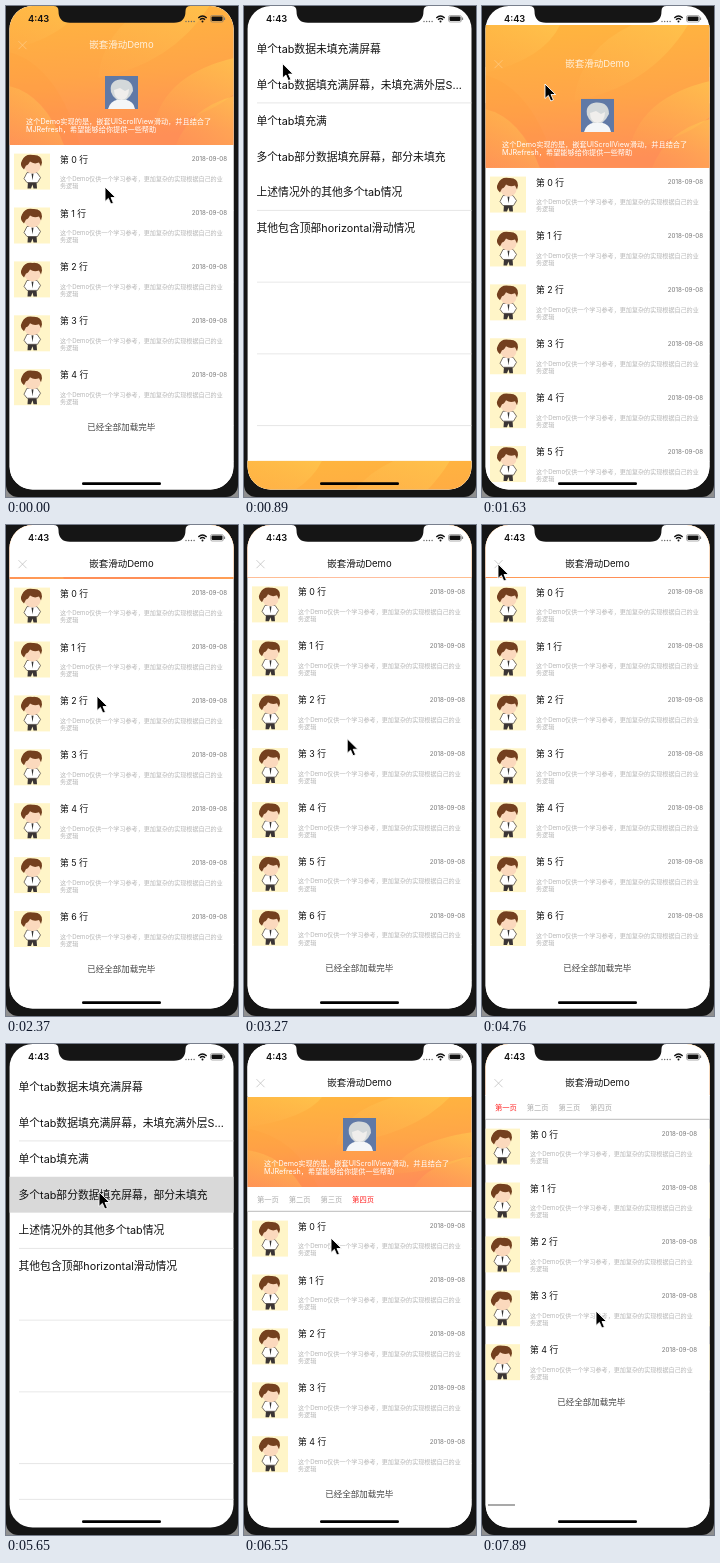
Write an HTML page that moves like this. It is 232 px wide and 491 px high and loops after 8000 ms.

```html
<!DOCTYPE html>
<html lang="zh-CN">
<head>
<meta charset="utf-8">
<style>
html, body { margin: 0; width: 100%; height: 100%; overflow: hidden; background: #8f8f8f; }
svg { display: block; width: 232px; height: 491px; }
text { font-family: Inter, "Noto Sans CJK SC", "Noto Sans CJK", sans-serif; white-space: pre; }
.menu { font-size: 10.8px; fill: #111; }
.title { font-size: 9.5px; text-anchor: middle; }
.name { font-size: 8.8px; fill: #111; }
.date { font-size: 6.2px; fill: #777; text-anchor: end; }
.desc { font-size: 6.08px; fill: #b4b4b4; }
.intro { font-size: 7.2px; fill: #fff; }
.end { font-size: 8.5px; fill: #444; text-anchor: middle; }
.tab { font-size: 7.3px; fill: #aaa; }
.tab.on { fill: #f22; }
.clock { font-size: 9.3px; font-weight: 600; fill: #111; }
</style>
</head>
<body>
<svg viewBox="0 0 232 491">
  <defs>
    <clipPath id="screen"><rect x="3.600" width="223.900" height="483.600" rx="23"/></clipPath>
    <clipPath id="bannerBox"><rect x="3" width="225" height="143"/></clipPath>
    <linearGradient id="sunset" x2=".12" y2="1">
      <stop stop-color="#ffb63e"/><stop offset=".55" stop-color="#ffa548"/><stop offset="1" stop-color="#ff8f57"/>
    </linearGradient>
    <linearGradient id="petal" x1="1" x2="0" y2="1">
      <stop stop-color="#ffcb52" stop-opacity=".6"/><stop offset="1" stop-color="#ffb452" stop-opacity=".1"/>
    </linearGradient>
    <g id="banner" clip-path="url(#bannerBox)">
      <rect x="3" width="225" height="143" fill="url(#sunset)"/>
      <g fill="url(#petal)">
        <path d="M3 0H78Q62 34 3 48Z"/>
        <path d="M92 76Q98 24 150 0H206Q168 62 92 76Z"/>
        <path d="M148 122Q160 72 228 56V92Q196 118 148 122Z"/>
        <path d="M170 143Q184 106 228 94V143Z"/>
        <path d="M3 84Q38 92 58 143H3Z"/>
      </g>
      <path d="M3 50Q52 64 74 143H58Q40 92 3 84Z" fill="#ff8a2c" fill-opacity=".1"/>
    </g>
    <g id="portrait">
      <rect width="33" height="33" fill="#6079a6"/>
      <path d="M3 33Q5 25 13 23.500H20Q29 25 30 33Z" fill="#f4f6f8"/>
      <path d="M6 16Q4 5 15 3.500Q28 3 28 15L25 20L21 24H12L8 20Z" fill="#d3d8da"/>
      <path d="M9 14L15 12L20 15L24 13Q24 23 16.500 24Q9 23 9 14Z" fill="#f0eeec"/>
    </g>
    <g id="figure">
      <rect width="36" height="36" fill="#fff5c8"/>
      <path d="M14 28H22.500L23 35H19.500L18.500 31L17 35H13.500Z" fill="#3a3434"/>
      <path d="M13 19H23L26.500 24L23.500 29H13L10 25Z" fill="#fff" stroke="#57504a" stroke-width=".8"/>
      <path d="M17.500 20L18.500 27L19.500 20Z" fill="#333"/>
      <ellipse cx="18.500" cy="13" rx="8" ry="7" fill="#fbd9bd"/>
      <path d="M10 16Q5 12 8 7Q11 0 19 1.500Q28 1 28 9L27 13L25 9Q20 11 16 8Q14 12 12 12Z" fill="#74401f"/>
    </g>
  </defs>

  <rect y="-40" width="232" height="531" rx="12" fill="#151515"/>
  <g clip-path="url(#screen)">
    <rect width="232" height="491" fill="#fff"/>
    <g id="menu"></g>
    <g id="pages"></g>
    <text class="clock" x="22" y="16.300">4:43</text>
    <g fill="#666">
      <circle cx="180" cy="15.500" r=".7"/><circle cx="182.700" cy="15.500" r=".7"/>
      <circle cx="185.400" cy="15.500" r=".7"/><circle cx="188.100" cy="15.500" r=".7"/>
    </g>
    <path d="M192.300 12Q196.500 8 200.700 12M194 13.700Q196.500 11.500 199 13.700" fill="none" stroke="#111" stroke-width="1.400"/>
    <circle cx="196.500" cy="15.500" r="1" fill="#111"/>
    <rect x="204.500" y="9.500" width="13" height="6.500" rx="1.800" fill="none" stroke="#777" stroke-width=".6"/>
    <rect x="205.500" y="10.500" width="11" height="4.500" rx="1" fill="#111"/>
    <path d="M218.600 11.500v2.500" stroke="#777"/>
  </g>
  <path d="M47.500 0Q52.500 0 52.500 5Q52.500 16.800 64 16.800H168Q179.500 16.800 179.500 5Q179.500 0 184.500 0Z" fill="#151515"/>
  <rect x="76" y="476.300" width="79" height="2.700" rx="1.350" fill="#000"/>
  <path id="cursor" d="M0 0V14.500L3.400 11.400L5.800 17L8.400 15.900L6 10.500H10.600Z" fill="#000" stroke="#fff" stroke-width=".9"/>
</svg>
<script>
const LOOP = 8000, STEP = 148.6, WIDTH = 225, HEIGHT = 484;
const $ = id => document.getElementById(id);
const range = (n, fn) => Array.from({ length: n }, (_, i) => fn(i)).join('');
const text = (cls, x, y, s) => `<text class="${cls}" x="${x}" y="${y}">${s}</text>`;
const clamp = v => Math.max(0, Math.min(1, v));
const move = (el, x, y) => el.setAttribute('transform', `translate(${x} ${y})`);

// Eased value through [time, value] points
function key(t, points) {
  let [t0, v0] = points[0];
  for (const [t1, v1] of points) {
    if (t < t1) {
      const p = clamp((t - t0) / (t1 - t0));
      return v0 + (v1 - v0) * p * p * (3 - 2 * p);
    }
    [t0, v0] = [t1, v1];
  }
  return v0;
}

const labels = ['单个tab数据未填充满屏幕', '单个tab数据填充满屏幕，未填充满外层S…', '单个tab填充满',
  '多个tab部分数据填充屏幕，部分未填充', '上述情况外的其他多个tab情况', '其他包含顶部horizontal滑动情况'];
const tabs = ['第一页', '第二页', '第三页', '第四页'];
const rowTop = i => 25.2 + 35.85 * i;

$('menu').innerHTML = '<rect id="pick" x="3" width="225" height="35.900" fill="#d9d9d9"/>' +
  [2, 5, 7, 9, 11, 12].map(i => `<path d="M13 ${rowTop(i)}H228" stroke="#ddd" stroke-width=".7"/>`).join('') +
  labels.map((s, i) => text('menu', 12.5, rowTop(i) + 21.8, s)).join('');

const list = (n, top) => range(n, i => {
  const y = top + i * 53.9;
  return `<use href="#figure" x="8" y="${y + 8.6}"/>` +
    text('name', 54, y + 17.6, `第 ${i} 行`) + text('date', 221, y + 16.4, '2018-09-08') +
    text('desc', 54, y + 36.2, '这个Demo仅供一个学习参考，更加复杂的实现根据自己的业') +
    text('desc', 54, y + 43.4, '务逻辑');
}) + text('end', 115.3, top + n * 53.9 + 15.5, '已经全部加载完毕');

function makePage(rows, tabbed) {
  const g = document.createElementNS('http://www.w3.org/2000/svg', 'g');
  const squeeze = tabbed ? 'translate(0 53) scale(1 .63)' : '';
  const strip = tabbed
    ? `<g class="lists">${range(4, i => `<g transform="translate(${i * WIDTH})">${list(rows, 168)}</g>`)}</g>
       <rect x="3" y="143" width="225" height="24" fill="#fff"/>
       <path d="M3 167.300H228" stroke="#bbb"/>` +
      tabs.map((s, i) => text('tab', 13 + i * 31.7, 158.2, s)).join('')
    : list(rows, 143);
  g.innerHTML = `<rect x="3" width="225" height="484" fill="#fff"/>
    <g class="body">
      <use href="#banner" transform="${squeeze}"/>
      <use href="#portrait" x="99" y="74"/>
      ${text('intro', 20, 121.8, '这个Demo实现的是，嵌套UIScrollView滑动，并且结合了')}
      ${text('intro', 20, 130.1, 'MJRefresh，希望能够给你提供一些帮助')}
      ${strip}
    </g>
    <rect class="nav" x="3" width="225" height="52" fill="#fff"/>
    ${text('title', 115.4, 42.2, '嵌套滑动Demo')}
    <path class="close" d="M12.500 35.200l8 8m0-8l-8 8" stroke-width=".7"/>`;
  $('pages').append(g);
  const part = c => g.querySelector('.' + c);
  const body = part('body'), nav = part('nav'), title = part('title'), close = part('close');
  return {
    g,
    draw(y, scroll) {
      g.style.display = y < HEIGHT ? '' : 'none';
      move(g, 0, y);
      move(body, 0, -scroll);
      const a = tabbed ? 1 : clamp((scroll - 8) / 60);
      const mix = (from, to) => Math.round(from + (to - from) * a);
      nav.setAttribute('opacity', a);
      title.setAttribute('fill', `rgb(${mix(255, 17)},${mix(240, 17)},${mix(220, 17)})`);
      close.setAttribute('stroke', `rgb(${mix(255, 185)},${mix(205, 185)},${mix(140, 185)})`);
    }
  };
}

const short = makePage(5), long = makePage(7), paged = makePage(5, true);
const lists = paged.g.querySelector('.lists'), tabEls = [...paged.g.querySelectorAll('.tab')];
paged.g.insertAdjacentHTML('beforeend', '<rect id="bar" y="460.500" width="27" height="1" fill="#555"/>');

// Sheet rises from the bottom at `start`
const rise = (t, start) => t < start ? HEIGHT : HEIGHT * (1 - clamp((t - start) / 400)) ** 2.26;

const pointer = [
  [0, 99, 181], [120, 99, 181], [500, 15, 38], [640, 15, 38], [1150, 63, 78], [1660, 63, 78],
  [1900, 86, 262], [2370, 91, 171], [2400, 91, 171], [2620, 93, 140], [3150, 102, 225],
  [3600, 109, 160], [3850, 110, 180], [3880, 110, 180], [4650, 16, 39], [4850, 16, 39],
  [5550, 93, 148], [6050, 93, 148], [6500, 87, 194], [6560, 87, 194], [6700, 90, 240],
  [7130, 95, 148], [7275, 60, 258], [7435, 60, 258], [7720, 114, 267]];

function draw(t) {
  short.draw(key(t, [[560, 0], [950, HEIGHT]]), key(t, [[0, 4], [300, 0]]));
  long.draw(t < 4780 ? rise(t, 1330) : key(t, [[4780, 0], [5180, HEIGHT]]),
    key(t, [[1880, 0], [2370, 89], [2400, 89], [2620, 114], [2950, 90], [3250, 90],
      [3600, 116], [3850, 97], [3880, 97], [4050, 90]]));
  paged.draw(rise(t, 5950), key(t, [[6600, 0], [7250, 92]]));

  const pan = key(t, [[7435, 3 * WIDTH], [7870, 6], [7880, 6], [8000, 0]]);
  move(lists, -pan, 0);
  tabEls.forEach((el, i) => el.classList.toggle('on', i === Math.round(pan / WIDTH)));
  $('bar').setAttribute('x', 4.3 + pan * .28);
  $('bar').setAttribute('opacity', t > 7440 ? 1 : 0);

  const picked = t > 1150 && t < 1750 ? 1 : t > 5600 && t < 6400 ? 3 : -1;
  $('pick').setAttribute('y', rowTop(picked));
  $('pick').setAttribute('opacity', picked < 0 ? 0 : 1);
  move($('cursor'), key(t, pointer.map(p => [p[0], p[1]])), key(t, pointer.map(p => [p[0], p[2]])));
}

function tick(now) {
  draw(Math.floor(now % LOOP / STEP + .06) * STEP);
  requestAnimationFrame(tick);
}
draw(0);
requestAnimationFrame(tick);
</script>
</body>
</html>
```
